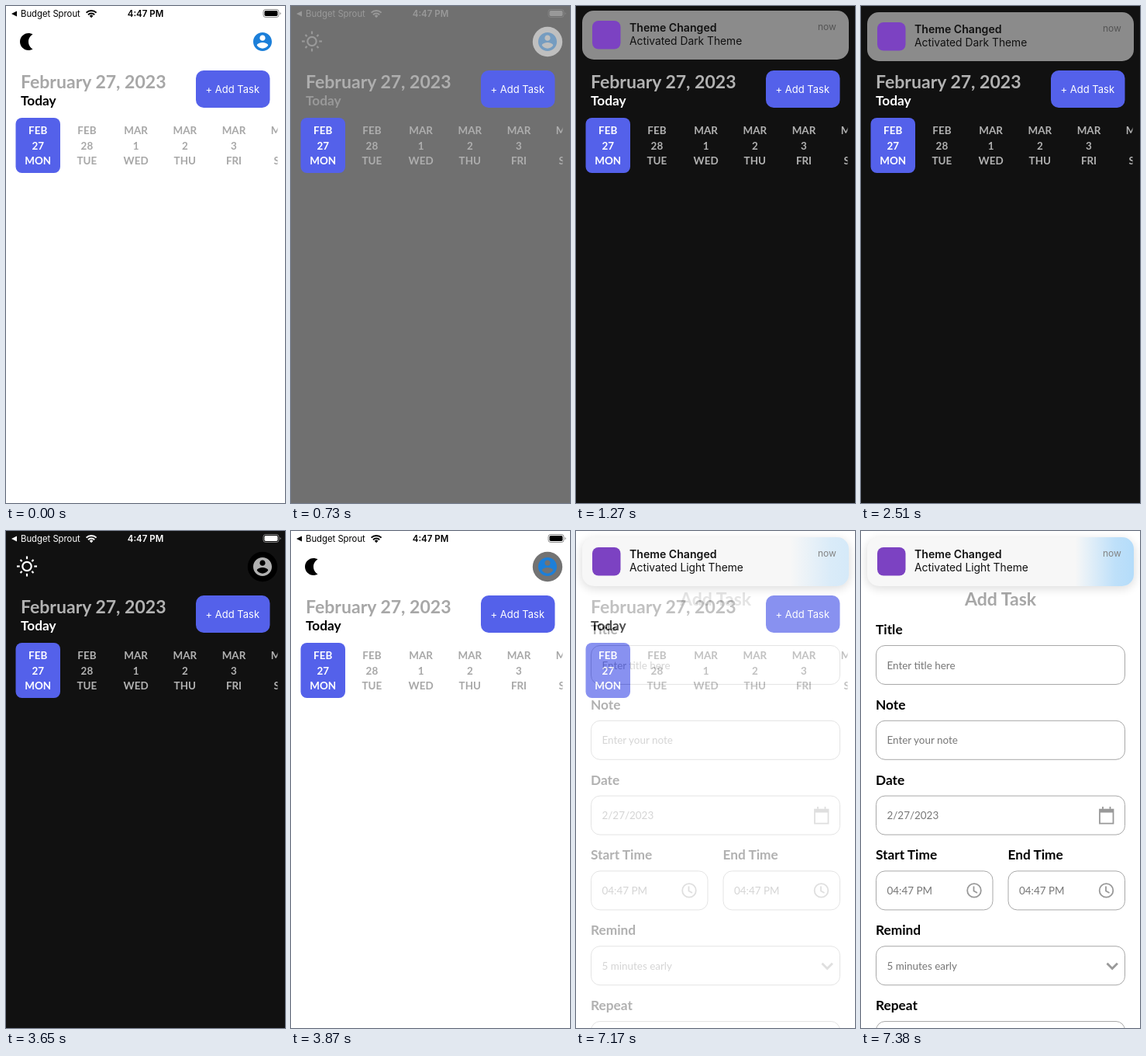
Animation, 360 px wide and 640 px high, one loop 8000 ms. Source, as an HTML page:

```html
<!DOCTYPE html>
<html lang="en">
<head>
<meta charset="utf-8">
<title>Task planner theme switch</title>
<style>
html, body { margin: 0; width: 100%; height: 100%; overflow: hidden; background: #fff; }
svg { display: block; width: 100%; height: 100%; }
text { font-family: Lato, sans-serif; fill: var(--fg); }
.ui { font-family: Inter, sans-serif; }
.mid { text-anchor: middle; }
.bold { font-weight: 700; }
.big { font-size: 23.04px; font-weight: 700; fill: var(--grey); }
.label { font-size: 17.28px; font-weight: 700; }
.day { font-size: 13.44px; font-weight: 700; text-anchor: middle; fill: var(--grey); }
.day.on { fill: #fff; }
.hint { font-size: 13.44px; fill: #777; }
.accent { fill: #5461ea; }
.fg { fill: var(--fg); }
.line { fill: none; stroke: #a8a8a8; }
.icon { fill: none; stroke: #999; stroke-width: 1.8; }
</style>
</head>
<body>
<svg id="stage" viewBox="0 0 360 640">
  <defs>
    <linearGradient id="sky">
      <stop offset=".78" stop-color="#b4dcfa" stop-opacity="0"/>
      <stop offset=".93" stop-color="#b4dcfa" stop-opacity=".85"/>
      <stop offset="1" stop-color="#b4dcfa"/>
    </linearGradient>
    <filter id="soft" x="-10%" y="-40%" width="120%" height="200%"><feGaussianBlur stdDeviation="6"/></filter>
    <clipPath id="strip"><rect x="12" y="140" width="338.5" height="80"/></clipPath>
  </defs>
  <rect width="360" height="640" fill="var(--bg)"/>

  <g id="status">
    <path class="fg" d="M7 10l7-3.5v7z"/>
    <text class="ui" x="19" y="14" font-size="11.3">Budget Sprout</text>
    <g fill="none" stroke="var(--fg)" stroke-width="2">
      <path d="M103.6 8.6a9.2 9.2 0 0 1 13 0M106 11.2a5.8 5.8 0 0 1 8.200 0"/>
    </g>
    <path class="fg" d="M110.100 15.200l-2.300-2.500a3.300 3.300 0 0 1 4.600 0z"/>
    <text class="ui mid" x="180" y="14" font-size="11.5" font-weight="600">4:47 PM</text>
    <rect x="332" y="4.500" width="20" height="10" rx="3" fill="none" stroke="var(--fg)" stroke-opacity=".45"/>
    <rect class="fg" x="333.500" y="6" width="17" height="7" rx="1.700"/>
    <path class="fg" opacity=".45" d="M353.500 8v3.200q1.300-.5 1.300-1.600t-1.300-1.600"/>
  </g>

  <path id="moon" class="fg" transform="translate(13.600 32.800) scale(1.100)" d="M14 2c1.820 0 3.530.5 5 1.350-2.990 1.730-5 4.950-5 8.650s2.010 6.920 5 8.650C17.530 21.500 15.820 22 14 22 8.480 22 4 17.520 4 12S8.480 2 14 2z"/>
  <g id="sun" transform="translate(27 45.500)" fill="none" stroke="var(--fg)" stroke-width="2.200">
    <circle r="5.700"/>
  </g>
  <circle id="ring" cx="331" cy="46" r="19.200"/>
  <path fill="var(--user)" transform="translate(316.600 31.600) scale(1.200)" d="M12 2C6.480 2 2 6.480 2 12s4.480 10 10 10 10-4.480 10-10S17.520 2 12 2zm0 3c1.660 0 3 1.340 3 3s-1.340 3-3 3-3-1.340-3-3 1.340-3 3-3zm0 14.200c-2.500 0-4.710-1.280-6-3.220.03-1.990 4-3.080 6-3.080 1.990 0 5.970 1.090 6 3.080-1.290 1.940-3.500 3.220-6 3.220z"/>

  <text class="big" x="19" y="105.500">February 27, 2023</text>
  <text class="label" x="19" y="127.500">Today</text>
  <rect class="accent" x="245" y="83" width="95.500" height="48" rx="10"/>
  <text class="ui mid" x="292.300" y="111.500" font-size="13" style="fill:#fff">+ Add Task</text>
  <rect class="accent" x="12.500" y="144" width="57.500" height="71" rx="8"/>
  <g id="days" clip-path="url(#strip)"></g>

  <g id="form">
    <rect width="360" height="640" fill="#fff"/>
    <text class="big mid" x="180" y="96">Add Task</text>
  </g>

  <g id="banner">
    <rect id="shade" x="6" y="10" width="348" height="65" rx="18" filter="url(#soft)" opacity=".12"/>
    <rect id="card" x="8" y="8" width="344" height="63" rx="15"/>
    <rect id="tint" x="8" y="8" width="344" height="63" rx="15" fill="url(#sky)"/>
    <rect x="21" y="21" width="36.500" height="36.500" rx="8" fill="#7c42c2"/>
    <g class="ui">
      <text class="ui" x="69" y="35" font-size="14.100" font-weight="600" style="fill:#111">Theme Changed</text>
      <text class="ui" id="message" x="69" y="52" font-size="13.800" style="fill:#111"></text>
      <text class="ui" id="now" x="312" y="32.500" font-size="12">now</text>
    </g>
  </g>
</svg>
<script>
const $ = id => document.getElementById(id);
const add = (id, markup) => $(id).insertAdjacentHTML('beforeend', markup);

// Sun rays
for (let i = 0; i < 8; i++) {
  const [from, to] = i % 2 ? [9, 12] : [9.3, 13];
  add('sun', `<path d="M${from} 0H${to}" transform="rotate(${i * 45})"/>`);
}

// Day strip
['FEB 27 MON', 'FEB 28 TUE', 'MAR 1 WED', 'MAR 2 THU', 'MAR 3 FRI', 'MAR 4 SAT'].forEach((day, i) =>
  day.split(' ').forEach((word, row) => add('days',
    `<text class="day${i ? '' : ' on'}" x="${41.2 + i * 63.2}" y="${165 + row * 19.7}">${word}</text>`)));

// Form fields
const clock = x => `<g class="icon"><circle cx="${x}" cy="25" r="8.800"/><path d="M${x - .5} 19.500v6l4.500 2.700"/></g>`;
const calendar = '<g class="icon"><path d="M308 17.500h17.500v18H308zM312 14v4M321.500 14v4"/><path stroke-width="4" d="M308 19.500h17.500"/></g>';
const chevron = '<path class="icon" style="stroke-width:2.800" d="M317.500 22l6.700 6.700 6.700-6.700"/>';

function field(row, label, hint, icon = '', x = 19.5, width = 321) {
  add('form', `<g transform="translate(0 ${147.5 + row * 96.8})">
    <text class="label" x="${x - .5}" y="-14.500">${label}</text>
    <rect class="line" x="${x}" width="${width}" height="50" rx="11.500"/>
    <text class="hint" x="${x + 14}" y="30">${hint}</text>${icon}</g>`);
}
field(0, 'Title', 'Enter title here');
field(1, 'Note', 'Enter your note');
field(2, 'Date', '2/27/2023', calendar);
field(3, 'Start Time', '04:47 PM', clock(146), 19.5, 150.5);
field(3, 'End Time', '04:47 PM', clock(316.5), 190, 150.5);
field(4, 'Remind', '5 minutes early', chevron);
field(5, 'Repeat', 'None', chevron);

// Stepped tracks: each run is [start time, values held about 110 ms each]
const drop = [-58, -36, -16, -6, -2, -1, 0];
const tracks = {
  dark: [0, [500, [0, 0, .6, 1]], [3650, [1, .4, 0]]],
  ring: [0, [500, [0, 0, .25, .54, .85, 1]], [3650, [1, .9, .55, .2, 0]]],
  lift: [-110, [840, drop], [2510, [0, -8, -32, -62, -110]], [4490, drop]],
  form: [0, [7170, [.3, .75, 1]]]
};
function at(name, t) {
  let [value, ...runs] = tracks[name];
  for (const [start, values] of runs)
    if (t >= start) value = values[Math.min(values.length - 1, Math.floor((t - start + 10) / 110))];
  return value;
}
const mix = (a, b, k) => `rgb(${a.map((v, i) => Math.round(v + (b[i] - v) * k))})`;
const grey = (a, b, k) => mix([a, a, a], [b, b, b], k);

function draw(t) {
  const dark = at('dark', t), lift = at('lift', t), form = at('form', t);
  const night = t < 3650;
  const colours = {
    bg: grey(255, 17, dark),
    fg: grey(0, 255, dark),
    grey: grey(167, 178, dark),
    user: mix([28, 127, 217], [176, 176, 176], dark)
  };
  for (const key in colours) $('stage').style.setProperty('--' + key, colours[key]);

  $('moon').style.opacity = dark > .5 ? 0 : 1;
  $('sun').style.opacity = dark > .5 ? 1 : 0;
  $('ring').style.fill = grey(255, 0, at('ring', t));
  $('status').style.opacity = lift > -30 ? 0 : 1;

  $('banner').setAttribute('transform', `translate(0 ${lift})`);
  $('card').style.fill = night ? '#8b8b8b' : '#f7f7f7';
  $('shade').style.opacity = night ? 0 : .12;
  $('tint').style.opacity = night ? 0 : .3 + .7 * form;
  $('now').style.fill = night ? '#555' : '#858585';
  $('message').textContent = `Activated ${night ? 'Dark' : 'Light'} Theme`;
  $('form').style.opacity = form;
}

function loop() {
  draw(performance.now() % 8000);
  requestAnimationFrame(loop);
}
loop();
</script>
</body>
</html>
```
